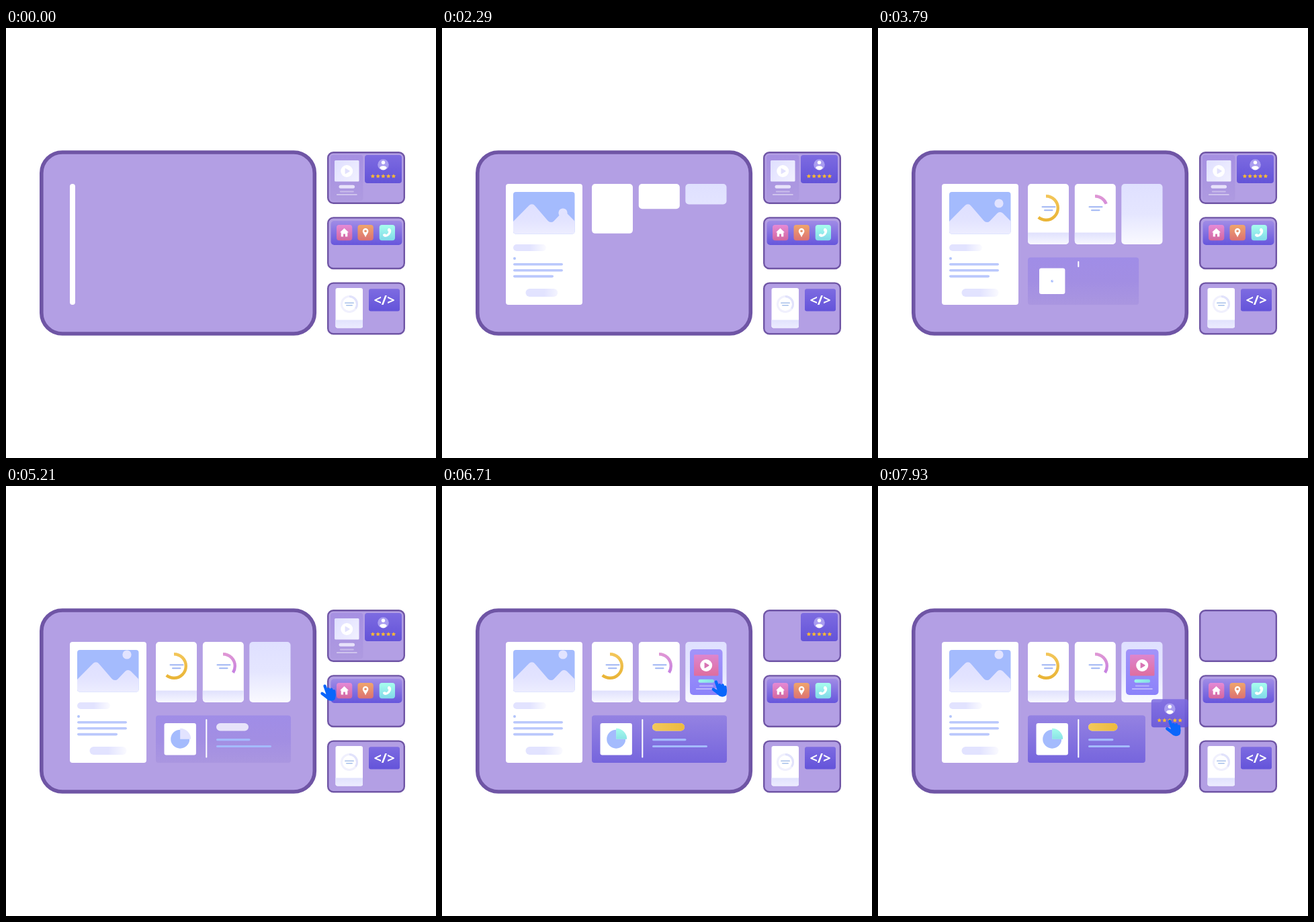
Animation of 640 by 640 pixels, one loop 8000 ms. Source, as an HTML page with a canvas:

```html
<!DOCTYPE html>
<html lang="en">
<head>
<meta charset="utf-8">
<title>Widget board</title>
<style>
  html, body { margin: 0; width: 100%; height: 100%; overflow: hidden; background: #fff; }
  canvas { display: block; width: 640px; height: 640px; }
</style>
</head>
<body>
<canvas id="stage" width="640" height="640"></canvas>
<script>
const ctx = document.getElementById('stage').getContext('2d');
const LOOP = 8000;
const PURPLE = '#b39fe4', FRAME = '#6f55a5', PALE = '#e2e3ff', BLUE = '#a4bbfd';

const clamp = v => Math.max(0, Math.min(1, v));
const lin = (t, a, b) => clamp((t - a) / (b - a));
const ease = (t, a, b) => { const u = lin(t, a, b); return u * u * (3 - 2 * u); };
const mix = (a, b, p) => a + (b - a) * p;
const mixPoint = (a, b, p) => [mix(a[0], b[0], p), mix(a[1], b[1], p)];

function gradient(x0, y0, x1, y1, ...colors) {
  const g = ctx.createLinearGradient(x0, y0, x1, y1);
  colors.forEach((c, i) => g.addColorStop(i / (colors.length - 1), c));
  return g;
}
const down = (y, h, ...colors) => gradient(0, y, 0, y + h, ...colors);
const across = (x, w, ...colors) => gradient(x, 0, x + w, 0, ...colors);

function box(x, y, w, h, r, fill) {
  if (w <= 0 || h <= 0) return;
  ctx.beginPath();
  ctx.roundRect(x, y, w, h, r);
  ctx.fillStyle = fill;
  ctx.fill();
}
const bar = (x, y, w, h, fill) => box(x, y, w, h, h / 2, fill);

function disc(x, y, r, fill) {
  ctx.beginPath();
  ctx.arc(x, y, Math.max(0, r), 0, 7);
  ctx.fillStyle = fill;
  ctx.fill();
}

function shape(path, fill) {
  ctx.fillStyle = fill;
  ctx.fill(new Path2D(path));
}

function ring(x, y, r, width, degrees, color) {
  if (degrees <= 0) return;
  ctx.beginPath();
  ctx.arc(x, y, r, -Math.PI / 2, (degrees - 90) * Math.PI / 180);
  ctx.lineWidth = width;
  ctx.lineCap = 'butt';
  ctx.strokeStyle = color;
  ctx.stroke();
}

// Runs a drawing in its own coordinate system and opacity.
function at(x, y, draw, alpha = 1) {
  if (alpha <= 0) return;
  ctx.save();
  ctx.translate(x, y);
  ctx.globalAlpha *= alpha;
  draw();
  ctx.restore();
}

function frame(x, y, w, h, r, width) {
  box(x, y, w, h, r, PURPLE);
  ctx.lineWidth = width;
  ctx.strokeStyle = FRAME;
  ctx.stroke();
}

function picture(t) {
  ctx.save();
  ctx.beginPath();
  ctx.roundRect(106, 244, 91.5 * ease(t, 250, 880), 62.5, 4);
  ctx.clip();
  box(106, 244, 92, 63, 0, BLUE);
  if (t > 1750) disc(180, mix(280, 251, lin(t, 1760, 4860)), 6.6, PALE);
  ctx.translate(0, 306.5);
  ctx.scale(1, ease(t, 750, 1420));
  ctx.beginPath();
  ctx.moveTo(106, -18.5);
  ctx.arcTo(134, -47, 162, -14.5, 6);
  ctx.arcTo(162, -14.5, 181.5, -35, 6);
  ctx.arcTo(181.5, -35, 198, -18.5, 6);
  ctx.lineTo(198, -18.5);
  ctx.lineTo(198, 1);
  ctx.lineTo(106, 1);
  ctx.fillStyle = down(-44, 44, '#dfe0ff', PALE, '#ededff');
  ctx.fill();
  ctx.restore();
}

function article(t) {
  box(95, 232, 114 * ease(t, -130, 680), 180, 4, '#fff');
  picture(t);
  bar(106, 322, 49 * ease(t, 800, 1620), 10, across(106, 49, PALE, PALE, '#fbfbff'));
  if (t > 900) disc(108, 343, 2, '#b2c4fb');
  const grow = ease(t, 950, 1820);
  [74, 74, 60].forEach((w, i) => bar(106, 350 + i * 8.9, w * grow, 3.6, '#bac8fc'));
  bar(124.5, 388, 55 * ease(t, 1250, 2600), 12, across(124.5, 55, PALE, PALE, '#fafaff'));
}

function ringCard(t, x, ringX, lineX, degrees, color, start, ringStart, ringLength) {
  box(x, 232, 61, 90 * ease(t, start, start + 700), 5, '#fff');
  const band = 17.5 * ease(t, start + 720, start + 1100);
  box(x, 322 - band, 61, band, [0, 0, 5, 5], down(304.5, 17.5, '#e0e1fd', '#f7f7ff'));
  ring(ringX, 268, 17.8, 4.4, degrees * ease(t, ringStart, ringStart + ringLength), color);
  const grow = ease(t, ringStart - 250, ringStart + 250);
  bar(lineX, 265.2, 21 * grow, 2, '#9fb5f4');
  bar(lineX + 3.5, 270.2, 13.5 * grow, 2, '#9fb5f4');
}

function panel(t, lit) {
  const shrink = Math.pow(Math.max(0, t - 7550) / 380, 1.5);
  const width = 201 * ease(t, 3250, 3990) - 26 * shrink;
  box(223, 341.5, width, 70.5, 4, down(341.5, 70.5, '#a08de7', '#a28ee3', '#aa96e0'));
  at(0, 0, () => box(223, 341.5, width, 70.5, 4, down(341.5, 70.5, '#9482e2', '#7665dd')), lit);

  at(259.2, 376.7, () => {
    const s = ease(t, 3445, 3925);
    box(-23.7 * s, -23.7 * s, 47.4 * s, 47.4 * s, 3, '#fff');
    const p = ease(t, 3700, 4100);
    ctx.scale(p, p);
    disc(0, 0, 14, BLUE);
    const slice = 'M0 0V-16A16 16 0 0 1 16 0Z';
    shape(slice, PALE);
    at(0, 0, () => shape(slice, down(-16, 16, '#a5fcec', '#8be3e5')), lit);
  });

  bar(297.3, 347, 2, 57.5 * ease(t, 3540, 4540), '#fff');
  const pill = 48 * ease(t, 3950, 4500) - 4.5 * shrink;
  bar(313, 353, pill, 11.5, '#e7e3fa');
  at(0, 0, () => bar(313, 353, pill, 11.5, across(313, pill, '#f3c95b', '#edb93f')), lit);
  bar(313, 376, 50.5 * ease(t, 4100, 4650) - 13 * shrink, 3.2, BLUE);
  bar(313, 385.9, 82 * ease(t, 4200, 4800) - 20 * shrink, 3.2, BLUE);
}

function mediaCard(color, settled, spin, squash) {
  box(0, 0, 48.5, 68, 4, down(0, 68, '#a690e2', '#ae9ae0'));
  box(6, 8, 36.5, 31.5, 1.5, gradient(6, 8, 42, 40, '#dfdfff', '#f2f1ff'));
  if (color > 0) {
    ctx.clearRect(0, 0, 0, 0);
    at(0, 0, () => box(6, 8, 36.5, 31.5, 1.5, down(8, 32, '#df87cf', '#df6d9e')), color);
  }
  mediaDetails(color, spin, squash);
}

function mediaDetails(color, spin, squash) {
  disc(24.2, 24, 9, '#fff');
  at(24.2, 24, () => {
    ctx.rotate(spin);
    ctx.lineJoin = 'round';
    shape('M-2.6 -3.6Q-2.6 -4.6 -1.6 -4L4 -.8Q5 0 4 .8L-1.6 4Q-2.6 4.6 -2.6 3.6Z', color > .5 ? '#d873b4' : '#e2e1fd');
  });
  const w = 23.5 * squash;
  bar(24.3 - w / 2, 44.8, w, 5, color > .5 ? across(12, 24, '#9df6ea', '#86dfe6') : '#e7e2fa');
  bar(13.8, 53.6, 21, 2, 'rgba(255,255,255,.36)');
  bar(8.8, 58, 31, 2, 'rgba(255,255,255,.42)');
}

function draggedMedia(lifted, p) {
  if (!lifted) return mediaCard(0, 0, 0, 1);
  const settled = lin(p, .8, 1);
  at(0, 0, () => box(0, 0, 48.5, 68, 5, down(0, 68, '#6f5bd6', '#5b46cf')), .78 * (1 - settled));
  at(0, 0, () => box(0, 0, 48.5, 68, 5, down(0, 68, '#a294f9', '#8b82fa')), settled);
  at(0, 0, () => box(6, 8, 36.5, 31.5, 1.5, down(8, 32, '#dd86cf', '#df6d9e')), mix(.92, 1, settled));
  mediaDetails(1, 2 * Math.PI * Math.pow(p, 2.3), 1 - .43 * Math.sin(Math.PI * p));
}

function star(x, y, r) {
  ctx.beginPath();
  for (let i = 0; i < 10; i++) {
    const a = i * Math.PI / 5 - Math.PI / 2, d = i % 2 ? r * .5 : r;
    ctx.lineTo(x + d * Math.cos(a), y + d * Math.sin(a));
  }
  ctx.closePath();
  ctx.fillStyle = '#f9b934';
  ctx.fill();
}

function ratingCard(alpha) {
  at(0, 0, () => box(0, 0, 55, 42, 4, down(0, 42, '#7d6be1', '#6353d8')), alpha);
  disc(27.5, 14.5, 8.3, '#a99df0');
  disc(27.5, 11.3, 2.7, '#fff');
  shape('M22.2 19.2C22.6 15.2 32.4 15.2 32.8 19.2Q30.5 22.3 27.5 22.3Q24.5 22.3 22.2 19.2Z', '#fff');
  for (let i = 0; i < 5; i++) star(11.9 + i * 7.75, 31.6, 3.4);
}

function iconBar() {
  box(483.5, 287, 106, 36, 5, down(287, 36, '#a08ce6', '#6656dc'));
  const icons = [
    [492, '#e58ad6', '#d3679f', 'M11.5 5L18 11.2H16.3V17.6H13V13.6H10V17.6H6.7V11.2H5Z'],
    [523.5, '#f0a56b', '#dc7272', 'M11.6 5A4.3 4.3 0 0 1 15.9 9.3C15.9 12.4 13.2 14 11.6 18.6C10 14 7.3 12.4 7.3 9.3A4.3 4.3 0 0 1 11.6 5Z'],
    [555.7, '#a7ffee', '#82d9e9', 'M13.2 5.2Q14.8 4.4 16 5.6Q18.6 8.5 16.8 12.2Q14.2 17.4 8.6 18Q6 17.9 5.2 15.3Q5.2 14 6.5 13.6L8.7 13.2L10.2 14.6Q13.2 13 13.8 10.3L12.3 9Q11.9 6.4 13.2 5.2Z'],
  ];
  for (const [x, top, bottom, glyph] of icons) at(x, 293, () => {
    box(0, 0, 23.3, 23.3, 4, down(0, 23, top, bottom));
    shape(glyph, '#fff');
  });
  disc(535.1, 302.2, 1.8, '#e59069');
}

function codeThumb() {
  box(490.5, 387, 40.5, 59.5, 3, '#fff');
  box(490.5, 434.5, 40.5, 12, [0, 0, 3, 3], down(434.5, 12, '#e1e2fd', '#ececff'));
  ring(511, 411, 11.5, 3, 360, '#f0f0fd');
  ring(511, 411, 11.5, 3, 125, '#e1e2fb');
  bar(504, 408.6, 14, 1.5, '#a5bfe9');
  bar(506, 412, 10, 1.5, '#a5bfe9');
  box(540, 388.3, 46, 33.2, 3, down(388, 33, '#7d6be1', '#6454da'));
  ctx.fillStyle = '#fff';
  ctx.font = '600 20px "Noto Sans", sans-serif';
  ctx.textAlign = 'center';
  ctx.fillText('</>', 563, 412);
}

function hand() {
  const blue = '#0a66fb';
  ctx.lineCap = ctx.lineJoin = 'round';
  ctx.strokeStyle = blue;
  ctx.lineWidth = 4.4;
  ctx.stroke(new Path2D('M1 2.4L5 14M6.4 7L8 13M10.8 7.4L12 13M14.6 10L15 16M-3 13.5L4 18'));
  shape('M2 9L15 9L16.8 14Q17.6 20 15.8 22.6Q11 26 6 23.4L-4 15.2L4 15Z', blue);
}

// Drag timing
const MEDIA_HOME = [483, 189], MEDIA_DROP = [369, 243], MEDIA_GRIP = [20.5, 54];
const RATING_HOME = [534, 189], RATING_GRIP = [26.5, 30.5];
const MEDIA_START = 5590, MEDIA_END = 6360, RATING_START = 7000;
const add = (a, b) => [a[0] + b[0], a[1] + b[1]];

function ratingPosition(t) {
  const u = Math.max(0, t - RATING_START) / 930;
  return add(RATING_HOME, [-127 * Math.pow(u, 1.6), 128 * Math.pow(u, 1.4)]);
}

function handPosition(t, media, rating) {
  const pickMedia = add(media, MEDIA_GRIP), pickRating = add(rating, RATING_GRIP);
  if (t < MEDIA_START) return mixPoint([425, 380], pickMedia, ease(t, 4730, 5560));
  return mixPoint(pickMedia, pickRating, ease(t, 6640, RATING_START));
}

function draw(t) {
  ctx.fillStyle = '#fff';
  ctx.fillRect(0, 0, 640, 640);
  frame(52.8, 185, 406.5, 270, 31, 5.6);
  for (let i = 0; i < 3; i++) frame(479.2, 185.2 + i * 97.2, 113.6, 75.6, 8, 2.4);
  iconBar();
  codeThumb();

  article(t);
  ringCard(t, 223, 250, 243.5, 219, down(248, 40, '#f3c65a', '#e9b435'), 1780, 2750, 800);
  ringCard(t, 292.8, 323, 313.5, 123, down(250, 30, '#df96d4', '#c47fe2'), 1982, 3400, 720);
  box(362.3, 232, 61.2, 90 * ease(t, 2017, 2717), 5, down(232, 90, '#dfe0ff', '#e5e6ff', '#fafaff'));
  panel(t, ease(t, 6040, 6360));

  const p = ease(t, MEDIA_START, MEDIA_END);
  const media = mixPoint(MEDIA_HOME, MEDIA_DROP, p);
  const rating = ratingPosition(t);
  at(...media, () => draggedMedia(t > MEDIA_START, p));
  at(...rating, () => ratingCard(t > RATING_START ? .86 : 1));
  at(...handPosition(t, media, rating), hand, lin(t, 4730, 4950));
}

function tick(now) {
  draw(now % LOOP);
  requestAnimationFrame(tick);
}
requestAnimationFrame(tick);
</script>
</body>
</html>
```
